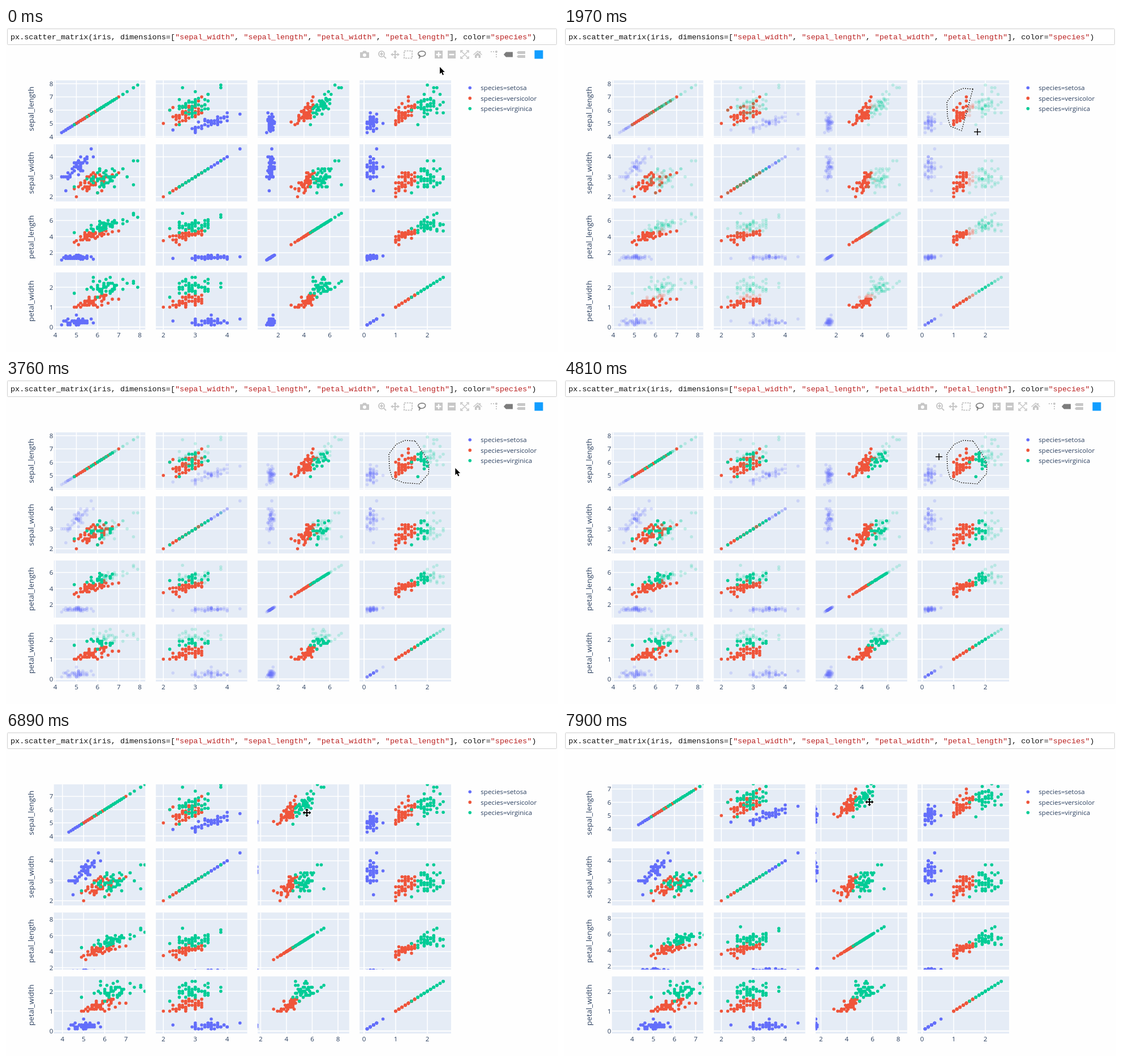
Animation of 976x574 px, one loop 8000 ms. Source, as an HTML page with a canvas:

```html
<!DOCTYPE html>
<html lang="en">
<head>
<meta charset="utf-8">
<title>Scatter matrix</title>
<style>
html, body { margin: 0; width: 100%; height: 100%; overflow: hidden; background: #fefefe; }
canvas, svg { position: absolute; left: 0; top: 0; width: 976px; height: 574px; }
text { font: 11.6px "Open Sans", sans-serif; fill: #2a3f5f; white-space: pre; }
.title { font-size: 13.5px; text-anchor: middle; }
.code { font: 13.48px "Liberation Mono", monospace; fill: #111; }
.str { fill: #ba2121; }
.tip { fill: #fff; text-anchor: middle; }
.icon { color: #c7c7c7; fill: currentColor; }
.icon.on { color: #7c7c7c; }
.line { fill: none; stroke: currentColor; stroke-width: 2; }
</style>
</head>
<body>
<canvas id="plot"></canvas>
<svg viewBox="0 0 976 574">
  <rect x="2.5" y="1.5" width="971" height="28" rx="1" fill="#fff" stroke="#cfcfcf"/>
  <text class="code" x="8" y="20" id="code"></text>
  <g id="labels"></g>
  <g id="ticks"></g>
  <g id="bar"></g>
  <g id="tip">
    <path d="M683 64.500l5-5.500 5 5.500z" fill="#69738a"/>
    <rect x="666" y="64" width="39.500" height="25.500" rx="2" fill="#69738a"/>
    <text class="tip" x="685.700" y="80.500">Pan</text>
  </g>
  <path id="halo" fill="none" stroke="#fff"/>
  <path id="outline" fill="none" stroke="#000" stroke-width="1.200" stroke-dasharray="2 2"/>
  <g id="cursor"></g>
</svg>
<script>
const W = 976, H = 574, LOOP = 8000, STEP = 150;
const CELL_W = 162, CELL_H = 101.5;
const $ = id => document.getElementById(id);

// lo, span: visible range, shared by the column and the row of a dimension
const DIMS = [
  { name: 'sepal_length', lo: 3.93, span: 4.335, tick: 1 },
  { name: 'sepal_width', lo: 1.76, span: 2.87, tick: 1 },
  { name: 'petal_length', lo: .4, span: 7.11, tick: 2 },
  { name: 'petal_width', lo: -.14, span: 2.89, tick: 1 }
].map((d, i) => ({
  ...d, view: d.lo, left: 84.5 + 180.2 * i, top: 92.5 + 113.5 * i,
  kx: CELL_W / d.span, ky: CELL_H / d.span
}));

// tie: how strongly each measure follows the overall flower size; rare: outlying flowers
const SPECIES = [
  { name: 'setosa', color: '#636efa',
    mean: [5, 3.42, 1.45, .24], sd: [.35, .36, .17, .1], tie: [.9, .82, .3, .3],
    rare: [[4.3, 3, 1.1, .1], [4.5, 2.3, 1.3, .3], [5.7, 4.4, 1.5, .4], [5.8, 4, 1.2, .2], [5, 3.5, 1.6, .6]] },
  { name: 'versicolor', color: '#ef553b',
    mean: [5.94, 2.78, 4.27, 1.33], sd: [.5, .31, .44, .2], tie: [.8, .7, .93, .85],
    rare: [[5, 2, 3.5, 1], [4.9, 2.4, 3.3, 1], [5.1, 2.5, 3, 1.1], [7, 3.2, 4.7, 1.4], [6, 2.2, 4, 1]] },
  { name: 'virginica', color: '#00cc96',
    mean: [6.45, 2.95, 5.45, 2.06], sd: [.56, .3, .5, .26], tie: [.92, .5, .93, .33],
    rare: [[4.9, 2.5, 4.5, 1.7], [7.9, 3.8, 6.4, 2], [7.7, 2.6, 6.9, 2.3], [7.7, 3.8, 6.7, 2.2], [6, 2.2, 5, 1.5]] }
];

// cursor path: time, x, y
const PATH = [
  [0, 767, 69], [300, 767, 69], [740, 723, 108], [840, 705, 107], [960, 690, 114], [1140, 677, 131],
  [1340, 678, 157], [1540, 683, 174], [1790, 703, 182], [1940, 731, 184], [2060, 747, 166],
  [2160, 748, 150], [2270, 740, 133], [2390, 727, 113], [2690, 732, 134], [3140, 732, 134],
  [3440, 663, 138], [3890, 860, 165], [4190, 803, 157], [4340, 662, 148], [4790, 663, 136],
  [5140, 663, 136], [5540, 687, 48], [5840, 687, 48], [5990, 663, 117], [6290, 593, 151],
  [6440, 563, 151], [6740, 532, 143], [6890, 532, 143], [7190, 526, 138], [7640, 536, 130], [7790, 540, 124]
];
const LASSO = [740, 2390], DESELECT = 5090, PAN_HOVER = 5540, PAN_CLICK = 5840, TIP_END = 6140, GRAB = 6440;
const LAG = 150;   // the plot trails the cursor
const HIDDEN = [LASSO, [4940, 5040], [6590, LOOP]];   // toolbar hides while the button is down

function cursorAt(t) {
  const i = PATH.findLastIndex(p => p[0] <= t), [ta, xa, ya] = PATH[i];
  const [tb, xb, yb] = PATH[i + 1] || [LOOP, xa, ya];
  const k = (t - ta) / (tb - ta);
  return [xa + (xb - xa) * k, ya + (yb - ya) * k];
}

function lassoAt(t) {
  if (t >= DESELECT) return [];
  const [start, end] = LASSO, tip = t < end ? t - LAG : end;
  if (tip < start) return [];
  const keys = PATH.filter(p => p[0] >= start && p[0] < tip).map(p => p.slice(1));
  return [...keys, cursorAt(tip)];
}

function barOpacity(t) {
  const press = HIDDEN.findLast(([down]) => down <= t);
  return press ? Math.max(0, Math.min(1, (t - press[1]) / 300)) : 1;
}

let seed = 11;
function rnd() {
  seed = (seed + 0x6d2b79f5) | 0;
  let n = Math.imul(seed ^ seed >>> 15, 1 | seed);
  n = n + Math.imul(n ^ n >>> 7, 61 | n) ^ n;
  return ((n ^ n >>> 14) >>> 0) / 4294967296;
}
const gauss = () => Math.sqrt(-2 * Math.log(1 - rnd())) * Math.cos(2 * Math.PI * rnd());

function grow({ mean, sd, tie, rare }) {
  const points = [...rare];
  while (points.length < 50) {
    const size = gauss();
    const z = tie.map(k => k * size + Math.sqrt(1 - k * k) * gauss());
    if (z.every(v => Math.abs(v) < 1.7)) points.push(z.map((v, d) => Math.round(10 * (mean[d] + sd[d] * v)) / 10));
  }
  return points;
}
for (const s of SPECIES) s.points = grow(s);

const px = (d, v) => d.left + (v - d.view) * d.kx;
const py = (d, v) => d.top + CELL_H - (v - d.view) * d.ky;
const inCol = (d, x) => x >= d.left && x <= d.left + CELL_W;
const inRow = (d, y) => y >= d.top && y <= d.top + CELL_H;
const ticks = d => Array.from({ length: 9 }, (_, i) => i * d.tick);

function setPan(t) {
  const [x0, y0] = cursorAt(GRAB), [x, y] = cursorAt(Math.max(GRAB, t - LAG));
  const [sepal, , petal] = DIMS;
  sepal.view = sepal.lo + (y - y0) / sepal.ky;
  petal.view = petal.lo - (x - x0) / petal.kx;
}

function inside(poly, x, y) {
  let hit = false;
  poly.forEach(([ax, ay], i) => {
    const [bx, by] = poly[(i + 1) % poly.length];
    if (ay > y !== by > y && x < ax + (y - ay) / (by - ay) * (bx - ax)) hit = !hit;
  });
  return hit;
}

const canvas = $('plot'), ctx = canvas.getContext('2d'), dpr = window.devicePixelRatio || 1;
canvas.width = W * dpr;
canvas.height = H * dpr;
ctx.scale(dpr, dpr);

function drawCell(row, col, isOn) {
  const r = DIMS.indexOf(row), c = DIMS.indexOf(col);
  ctx.save();
  ctx.beginPath();
  ctx.rect(col.left, row.top, CELL_W, CELL_H);
  ctx.clip();
  ctx.fillStyle = '#e5ecf6';
  ctx.fillRect(col.left, row.top, CELL_W, CELL_H);
  ctx.fillStyle = '#fff';
  for (const v of ticks(col)) ctx.fillRect(px(col, v) - .8, row.top, v ? 1.5 : 2, CELL_H);
  for (const v of ticks(row)) ctx.fillRect(col.left, py(row, v) - .8, CELL_W, v ? 1.5 : 2);
  for (const s of SPECIES) {
    ctx.fillStyle = s.color;
    for (const on of [false, true]) {
      ctx.globalAlpha = on ? 1 : .2;
      for (const p of s.points) {
        if (isOn(p) !== on) continue;
        ctx.beginPath();
        ctx.arc(px(col, p[c]), py(row, p[r]), 2.8, 0, 7);
        ctx.fill();
      }
    }
  }
  ctx.restore();
}

const tickText = () => DIMS.flatMap(d => ticks(d).map(v => {
  const x = px(d, v), y = py(d, v);
  return (inCol(d, x) ? `<text x="${x}" y="548" text-anchor="middle">${v}</text>` : '') +
    (inRow(d, y) ? `<text x="83.5" y="${y + 4.2}" text-anchor="end">${v}</text>` : '');
})).join('');

const ICONS = [
  ['camera', 634, '<path fill-rule="evenodd" d="M-8-4h4l1.500-2.500h5L4-4h4V6H-8zM0-2a3 3 0 100 6 3 3 0 000-6z"/>'],
  ['zoom', 665, '<circle class="line" cx="-1" cy="-1" r="5"/><path class="line" d="M3 3l4 4M-4-1h6M-1-4v6"/>'],
  ['pan', 688, '<path class="line" d="M-5 0H5M0-5V5"/><path d="M-8 0l4-3v6zM8 0L4-3v6zM0-8l3 4h-6zM0 8l3-4h-6z"/>'],
  ['box', 711, '<rect class="line" x="-7" y="-6.500" width="14" height="13" stroke-dasharray="3 1.500"/>'],
  ['lasso', 735, '<path class="line" style="stroke-width:1.6" d="M-4 2C-8 0-7-5 0-6 9-6 8 1 2 3-2 4-6 3-5 1-3 0-2 3-5 7"/>'],
  ['plus', 765, '<path fill-rule="evenodd" d="M-7-7H7V7H-7zM-1.200-4.500v3.300h-3.300v2.400h3.300v3.300h2.400V1.200h3.300v-2.400H1.200v-3.300z"/>'],
  ['minus', 788, '<path fill-rule="evenodd" d="M-7-7H7V7H-7zM-4.500-1.200v2.400h9v-2.400z"/>'],
  ['fit', 811, '<path class="line" style="stroke-width:1.5" d="M-7-3v-4h4M3-7h4v4M7 3v4H3M-3 7h-4V3M-6-6L6 6M6-6L-6 6"/>'],
  ['home', 834, '<path d="M-8 0l8-7 3 2.600V-6h2v3.400L8 0 7 1 0-5-7 1zM-5 1l5-4.500L5 1v5H1.500V2h-3v4H-5z"/>'],
  ['spike', 863, '<path class="line" stroke-dasharray="2 2" d="M-6-5H4M4-5V7"/><circle cx="4" cy="-5" r="2"/>'],
  ['tag', 888, '<path d="M-8 0l4-4.500H8v9H-4z"/>'],
  ['tags', 911, '<path d="M-8-3.300L-5.500-6H7v5H-5.500zM-8 3.700L-5.500 1H7v5H-5.500z"/>']
];

const PLUS = '<path d="M-6 0H6M0-6V6" stroke="#fff" stroke-width="2.600" opacity=".6"/><path d="M-6 0H6M0-6V6" stroke="#000" stroke-width="1.500"/>';
const MOVE = '<path d="M0-7.500L3-4H1v3h3v-2L7.500 0 4 3V1H1v3h2L0 7.500-3 4h2V1h-3v2L-7.500 0-4-3v2h3v-3h-2z" stroke="#fff" stroke-width="1.600" paint-order="stroke"/>';
const ARROW = '<path transform="scale(.88)" d="M0 0v14l3.300-3 2.400 5.400 2.300-1-2.400-5.200H10z" stroke="#fff" stroke-width="1.400" paint-order="stroke"/>';
const HAND = '<path d="M-1 0q1.500-1.500 2.500 0v6l5.500 1.500q2 1 1 4L6.500 16H0l-4.500-6q0-2 2-1L-1 10z" fill="#fff" stroke="#000"/>';

function cursorShape(t, x, y) {
  if (y < 58) return HAND;
  const over = DIMS.some(d => inCol(d, x)) && DIMS.some(d => inRow(d, y));
  return !over ? ARROW : t < PAN_CLICK ? PLUS : MOVE;
}

function buildStatic() {
  const list = DIMS.map(d => `"${d.name}"`);
  const code = `px.scatter_matrix(iris, dimensions=[${[list[1], list[0], list[3], list[2]].join(', ')}], color="species")`;
  $('code').innerHTML = code.replace(/"\w+"/g, s => `<tspan class="str">${s}</tspan>`);
  const titles = DIMS.map(d =>
    `<text class="title" transform="translate(49 ${d.top + CELL_H / 2}) rotate(-90)">${d.name}</text>`);
  const legend = SPECIES.map((s, i) => {
    const y = 106 + i * 18.4;
    return `<circle cx="820.300" cy="${y}" r="2.800" fill="${s.color}"/><text x="839.300" y="${y + 4.2}">species=${s.name}</text>`;
  });
  $('labels').innerHTML = titles.concat(legend).join('');
  $('bar').innerHTML = ICONS.map(([name, x, art]) =>
    `<g class="icon" id="icon-${name}" transform="translate(${x} 47)">${art}</g>`).join('') +
    '<rect x="934.500" y="39.500" width="15" height="15" fill="#119dff"/>';
  $('icon-tag').classList.add('on');
}

function render(t) {
  setPan(t);
  const lasso = lassoAt(t);
  const isOn = p => !lasso.length || inside(lasso, px(DIMS[3], p[3]), py(DIMS[0], p[0]));
  ctx.clearRect(0, 0, W, H);
  for (const row of DIMS) for (const col of DIMS) drawCell(row, col, isOn);

  const d = lasso.length ? `M${lasso.join('L')}Z` : '';
  $('halo').setAttribute('d', d);
  $('outline').setAttribute('d', d);
  $('ticks').innerHTML = tickText();
  $('bar').setAttribute('opacity', barOpacity(t));
  $('tip').style.display = t >= PAN_HOVER && t < TIP_END ? '' : 'none';
  $('icon-pan').classList.toggle('on', t >= PAN_HOVER);
  $('icon-lasso').classList.toggle('on', t < PAN_CLICK);

  const [x, y] = cursorAt(t);
  $('cursor').setAttribute('transform', `translate(${x} ${y})`);
  $('cursor').innerHTML = cursorShape(t, x, y);
}

buildStatic();
const start = performance.now();
let shown = -1;
function tick() {
  const now = Math.max(0, performance.now() - start) % LOOP;
  const t = Math.max(0, Math.floor((now + 10) / STEP) * STEP - 10);
  if (t !== shown) render(shown = t);
  requestAnimationFrame(tick);
}
tick();
</script>
</body>
</html>
```
